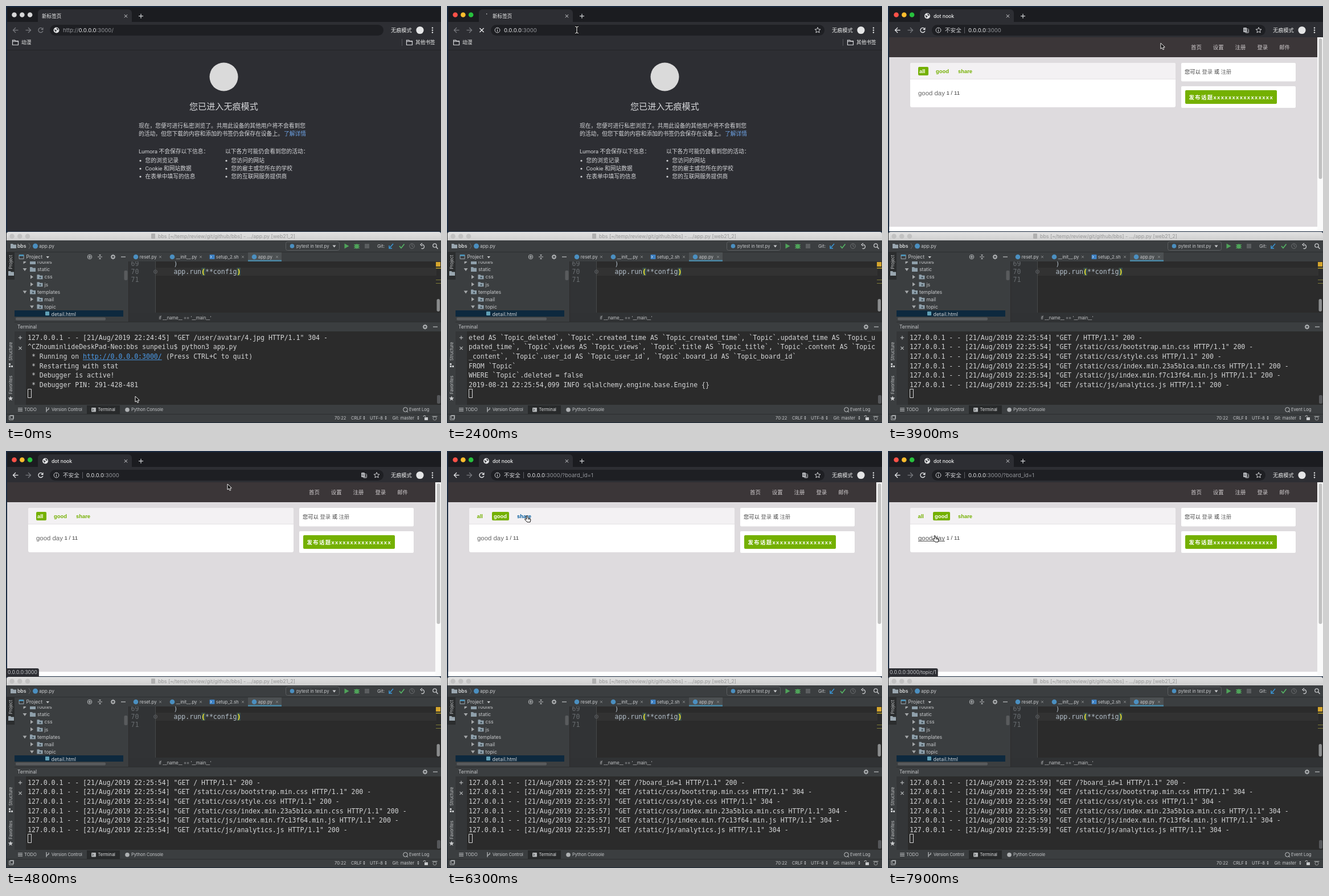
Recreate the animation shown at these times as an HTML page with a canvas. Size 764 px wide and 733 px high, loop 8 s.

```html
<!DOCTYPE html>
<html lang="zh">
<head>
<meta charset="utf-8">
<title>dot nook</title>
<style>
html, body { margin: 0; width: 100%; height: 100%; overflow: hidden; background: #2b2b2b; }
canvas { display: block; }
</style>
</head>
<body>
<canvas id="stage" width="764" height="733"></canvas>
<script>
const c = document.getElementById('stage').getContext('2d');
const UI = 'Inter, "Noto Sans CJK SC", "Noto Sans CJK", sans-serif';
const WEB = 'Roboto, "Noto Sans CJK SC", "Noto Sans CJK", sans-serif';
const PAGE = '"Liberation Sans", "Noto Sans CJK SC", "Noto Sans CJK", sans-serif';
const MONO = '"DejaVu Sans Mono", monospace';
const LOOP = 8000, CODE = 11.53, GREEN = '#74b000', PY = '#4b8fc0';

function text(s, x, y, size, color, family = UI, weight = 400, gap = 0) {
  c.font = `${weight} ${size}px ${family}`;
  c.letterSpacing = gap + 'px';
  c.fillStyle = color;
  c.fillText(s, x, y);
  const w = c.measureText(s).width;
  c.letterSpacing = '0px';
  return w;
}
function rect(x, y, w, h, color, r = 0) {
  c.fillStyle = color;
  c.beginPath();
  c.roundRect(x, y, w, h, r);
  c.fill();
}
function box(x, y, w, h, color, r = 0, lw = 1) {
  c.strokeStyle = color;
  c.lineWidth = lw;
  c.beginPath();
  c.roundRect(x, y, w, h, r);
  c.stroke();
}
function dot(x, y, r, color) {
  c.fillStyle = color;
  c.beginPath();
  c.arc(x, y, r, 0, 7);
  c.fill();
}
function arc(x, y, r, color, lw = 1, a = 0, b = Math.PI * 2) {
  c.strokeStyle = color;
  c.lineWidth = lw;
  c.beginPath();
  c.arc(x, y, r, a, b);
  c.stroke();
}
function trace(p) {
  c.beginPath();
  for (let i = 0; i < p.length; i += 2) c.lineTo(p[i], p[i + 1]);
}
function line(color, lw, ...p) {
  c.strokeStyle = color;
  c.lineWidth = lw;
  trace(p);
  c.stroke();
}
function poly(color, ...p) {
  c.fillStyle = color;
  trace(p);
  c.fill();
}
function cross(x, y, r, color, lw = 1) {
  line(color, lw, x - r, y - r, x + r, y + r);
  line(color, lw, x - r, y + r, x + r, y - r);
}
function plus(x, y, r, color) {
  line(color, 1.2, x - r, y, x + r, y);
  line(color, 1.2, x, y - r, x, y + r);
}
function folder(x, y, color) {
  poly(color, x, y, x + 4, y, x + 5, y + 1.5, x + 10, y + 1.5, x + 10, y + 8, x, y + 8);
}
function folderLine(x, y) {
  line('#d5d6d9', 1.2, x, y, x + 4, y, x + 5.5, y + 1.7, x + 10, y + 1.7, x + 10, y + 8.5, x, y + 8.5, x, y, x + 4, y);
  line('#d5d6d9', 1.2, x, y + 2, x + 10, y + 2);
}
function gear(x, y) {
  arc(x, y, 2.6, '#b4b7b9', 1.6);
  for (let i = 0; i < 8; i++) {
    const a = i * Math.PI / 4, u = Math.cos(a), v = Math.sin(a);
    line('#b4b7b9', 1.2, x + u * 3, y + v * 3, x + u * 4.5, y + v * 4.5);
  }
}
function star(x, y, r, color, filled) {
  const p = [];
  for (let i = 0; i <= 10; i++) {
    const a = -Math.PI / 2 + i * Math.PI / 5, d = i % 2 ? r * .45 : r;
    p.push(x + d * Math.cos(a), y + d * Math.sin(a));
  }
  filled ? poly(color, ...p) : line(color, 1, ...p);
}
function globe(x, y) {
  dot(x, y, 5, '#e3e4e6');
  poly('#393b3f', x - 4, y - 1.5, x - 1, y - .5, x + 1, y + 1, x - 1, y + 2, x - 1, y + 4);
  poly('#393b3f', x, y - 4, x + 3, y - 3, x + 3.5, y, x + 1, y - 1);
}
function vertical(s, x, y) {
  c.save();
  c.translate(x, y);
  c.rotate(-Math.PI / 2);
  c.textAlign = 'center';
  text(s, 0, 0, 7.5, '#c6c8ca');
  c.restore();
}
function clip(x, y, w, h, draw) {
  c.save();
  c.beginPath();
  c.rect(x, y, w, h);
  c.clip();
  draw();
  c.restore();
}

// Pointer track: time, x, y of the hot spot
const track = [
  [0, 227, 686], [300, 227, 686], [1300, 228, 42], [3400, 228, 42], [4100, 541, 71],
  [4500, 541, 71], [4800, 389, 58], [5300, 96, 115], [5800, 96, 115], [6300, 140, 114],
  [6600, 140, 114], [7000, 96, 115], [7400, 96, 115], [7900, 82, 149], [8000, 82, 149]
];
function pointer(t) {
  let i = 1;
  while (track[i][0] < t) i++;
  const [t0, x0, y0] = track[i - 1], [t1, x1, y1] = track[i];
  const k = (t - t0) / (t1 - t0), e = k * k * (3 - 2 * k);
  return [x0 + (x1 - x0) * e, y0 + (y1 - y0) * e];
}
const between = (t, a, b) => t >= a && t < b;
const inside = (p, x, y, w, h) => between(p[0], x, x + w) && between(p[1], y, y + h);

function browser(t, p) {
  const active = t >= 1400, open = t >= 2600, sent = t >= 2100;
  const busy = between(t, 2100, 3200) || between(t, 5500, 5800) || between(t, 7200, 7500);
  rect(0, 0, 764, 398, '#1a2a40');
  rect(2, 2, 762, 394, '#1b1c20');
  rect(2, 28, 762, 368, '#2d2e33');
  rect(56, 6, 165, 24, '#2d2e33', [6, 6, 0, 0]);
  ['#ff5148', '#fdbc2d', '#27c13d'].forEach((col, i) => dot(14.5 + 13.8 * i, 15.5, 4.3, active ? col : '#d6d6d7'));

  if (busy) {
    const a = open ? -1.65 + (t - 2800) / 160 : -1.8 - (t - 2400) / 200;
    arc(70, 18, 4, '#e6e7e9', 1.5, a, a + (open ? 1.9 : .3));
  } else if (open) globe(69, 17.5);
  text(open ? 'dot nook' : '新标签页', sent ? 80 : 63, 20.7, 8.6, '#eceded', UI, 500);
  cross(210.5, 17.7, 2.6, '#d8d9dc');
  plus(237, 17.7, 4, '#d8d9dc');

  const off = '#77797e', on = '#e8e9eb';
  [[17, open ? on : off, 1], [39, off, -1]].forEach(([x, col, d]) => {
    line(col, 1.3, x - 4.5 * d, 42.5, x + 4.5 * d, 42.5);
    line(col, 1.3, x, 38, x - 4.5 * d, 42.5, x, 47);
  });
  if (busy) cross(61, 42.5, 3.6, on, 1.4);
  else {
    const col = active ? on : off;
    arc(61, 42.5, 4, col, 1.4, .3, 5.3);
    poly(col, 65.5, 37.5, 65.5, 42, 61, 42);
  }
  const focused = active && !sent;
  rect(77, 33, 586, 19, focused ? '#2f3136' : '#1e1f23', 9.5);
  const grey = '#94969b', white = '#e8e9eb', size = 9.6;
  let x = 100;
  if (!sent) {
    if (focused) box(76.7, 32.7, 586.6, 19.4, '#51779e', 9.7, 1.5);
    globe(88.5, 42.5);
    x += text('http://', x, 45.8, size, grey);
    x += text('0.0.0.0', x, 45.8, size, white);
    x += text(':3000/', x, 45.8, size, grey);
    if (focused && (t - 1400) % 1000 < 500) line(white, 1, x + .5, 37, x + .5, 48);
  } else {
    arc(88.5, 42.5, 4.4, '#d5d6d9');
    line('#d5d6d9', 1.1, 88.5, 42, 88.5, 45);
    dot(88.5, 40.3, .7, '#d5d6d9');
    if (open) {
      text('不安全', x, 45.8, 9.6, '#d5d6d9');
      line('#5d5f64', 1, 134.5, 37, 134.5, 48);
      x = 141;
    }
    x += text('0.0.0.0', x, 45.8, size, white);
    text(':3000' + (t >= 5500 ? '/?board_id=1' : ''), x, 45.8, size, grey);
    star(651, 42.7, 5.2, '#d5d6d9');
    if (open && !busy) {
      rect(624, 38, 6, 8, '#b9bbbf', 1);
      box(627.5, 40.5, 6, 6.5, '#b9bbbf', 1);
      text('G', 625, 44, 5, '#1e1f23');
      text('文', 628.5, 46, 4.5, '#d5d6d9');
    }
  }
  text('无痕模式', 676, 46, 9.2, '#eceded', UI, 500);
  dot(727, 42.5, 6.6, '#e4e5e6');
  for (let i = 0; i < 3; i++) dot(749, 38.5 + 4 * i, 1.2, '#e4e5e6');

  open ? site(t, p) : welcome();
  const status = statusAt(t);
  if (status) {
    c.font = '400 8.6px ' + UI;
    const w = c.measureText(status).width + 6;
    rect(0, 382, w, 15, '#2d2e33', [0, 3, 0, 0]);
    text(status, 3, 392.2, 8.6, '#c8cacd');
  }
}

function statusAt(t) {
  const url = '0.0.0.0:3000';
  if (between(t, 4200, 4950)) return url;
  if (between(t, 5400, 5500) || between(t, 7100, 7200)) return url + '/?board_id=1';
  if (between(t, 6400, 6800)) return url + '/?board_id=2';
  return t >= 7800 ? url + '/topic/1' : '';
}

function welcome() {
  const col = '#d6d7da', s = 9.77;
  folderLine(11.5, 60);
  text('动漫', 27, 67.3, 8.7, '#eceded', UI, 500);
  line('#55575c', 1, 695.5, 58, 695.5, 70);
  folderLine(703.5, 60);
  text('其他书签', 719, 67.3, 8.7, '#eceded', UI, 500);
  line('#232428', 1, 2, 77.5, 764, 77.5);
  dot(382.5, 124.5, 25, '#dadada');
  text('您已进入无痕模式', 322, 181.5, 15.1, col, WEB);
  text('现在，您便可进行私密浏览了。共用此设备的其他用户将不会看到您', 233, 214, s, col, WEB);
  text('的活动，但您下载的内容和添加的书签仍会保存在设备上。', 233, 228.3, s, col, WEB);
  text('了解详情', 488, 228.3, s, '#6fa5e8', WEB);
  text('Lumora 不会保存以下信息：', 233, 258.5, s, col, WEB);
  text('以下各方可能仍会看到您的活动：', 385, 258.5, s, col, WEB);
  const lists = [
    [236, '您的浏览记录', 'Cookie 和网站数据', '在表单中填写的信息'],
    [387, '您访问的网站', '您的雇主或您所在的学校', '您的互联网服务提供商']
  ];
  for (const [x, ...items] of lists) items.forEach((item, i) => {
    dot(x, 272 + 14 * i, 1.6, col);
    text(item, x + 8.5, 275.3 + 14 * i, s, col, WEB);
  });
}

function site(t, p) {
  const styled = t >= 3100;
  rect(2, 55, 752, 333, '#dedbde');
  rect(2, 388, 752, 8, '#fff');
  rect(2, 55, 752, 35, '#3b3638');
  rect(754, 55, 10, 341, '#fafafa');
  rect(756.5, 57, 6, 247, '#c1c1c1', 3);
  ['首页', '设置', '注册', '登录', '邮件'].forEach((s, i) =>
    text(s, 532 + 38.8 * i, 75.7, 9.4, i === 0 && inside(p, 530, 64, 24, 16) ? '#fff' : '#d0ccce', PAGE));

  rect(39, 100, 466, 78, '#fff', 3);
  rect(39, 100, 466, 28.5, '#f3f1f3', [3, 3, 0, 0]);
  line('#e3e1e3', 1, 39, 128.5, 505, 128.5);
  const chosen = t >= 5600 ? 1 : 0;
  [['all', 55, 53, 18], ['good', 84, 79, 30], ['share', 123, 120, 30]].forEach(([s, x, bx, w], i) => {
    const on = i === chosen, hover = inside(p, bx, 107, w, 15);
    if (on) rect(bx, 107, w, 15, GREEN, 2);
    const tx = i === 0 && !on ? 52.5 : i === 1 && on ? 82 : x;
    text(s, tx, 118, 9.4, on ? '#fff' : hover ? '#005a9c' : GREEN, PAGE, 700);
  });
  const onTopic = inside(p, 52, 146, 50, 13);
  const w = text('good day', 53, 157, 11.4, onTopic ? '#555' : '#666', PAGE);
  if (onTopic) line('#555', 1, 53, 158.5, 53 + w, 158.5);
  text('1 / 11', 102.5, 156, 9.7, '#333', PAGE);

  rect(515, 100, 201, 32.5, '#fff', 2);
  let x = 521;
  ['您可以 ', '登录 ', '或 ', '注册'].forEach((s, i) => x += text(s, x, 119, 9.3, i % 2 ? '#666' : '#333', PAGE));
  rect(515, 141, 201, styled ? 38 : 34.5, '#fff', 2);
  const label = '发布话题' + 'x'.repeat(16);
  if (styled) {
    rect(522, 148, 161, 24, GREEN, 2);
    text(label, 528.5, 163.5, 9.4, '#fff', PAGE, 700, 1.38);
  } else {
    rect(522, 149, 138, 18, '#f0f0ea');
    text(label, 522.5, 162.3, 11.4, '#1450b8', PAGE);
  }
}

function ide(t) {
  const col = '#c8cacc', panel = '#3b3e40';
  rect(0, 398, 764, 335, panel);
  const bar = c.createLinearGradient(0, 397, 0, 412);
  bar.addColorStop(0, '#e2e2e2');
  bar.addColorStop(1, '#cfcfcf');
  rect(1, 397, 763, 15, bar, [4, 4, 0, 0]);
  for (let i = 0; i < 3; i++) dot(10.5 + 13.7 * i, 404.7, 4.3, '#c2c2c2');
  rect(255, 400, 7, 9, '#b0b0b0', 1);
  text('bbs [~/temp/review/git/github/bbs] - .../app.py [web21_2]', 267, 408, 8.87, '#999');

  // Navigation row
  folder(8, 418, '#9aa7b0');
  text('bbs', 20, 425.2, 8.6, '#d6d8d9', UI, 600);
  line('#65686a', 1, 40, 417, 43, 422, 40, 427);
  dot(51.5, 422, 4.5, PY);
  text('app.py', 58, 425.2, 8.4, col);
  box(491.5, 414.5, 94, 15, '#5b5e60', 3);
  dot(502.5, 422, 3.8, PY);
  text('pytest in test.py', 510, 425, 7.65, col);
  poly(col, 573.5, 420.5, 579.5, 420.5, 576.5, 424.5);
  poly('#4fa35a', 594.5, 417.5, 602.5, 422, 594.5, 426.5);
  rect(612.5, 418.5, 7, 8, '#4fa35a', 3);
  for (let i = 0; i < 3; i++) line('#4fa35a', 1, 611, 419.5 + 3 * i, 621, 419.5 + 3 * i);
  rect(630, 418, 8, 8, '#5b5e60');
  text('Git:', 652, 425, 8.2, col);
  line('#3a96d6', 1.5, 680, 418, 673.5, 425.5);
  line('#3a96d6', 1.5, 673, 421, 673, 426, 678, 426);
  line('#55b364', 1.7, 691, 422, 694, 425.5, 699.5, 418.5);
  arc(713, 422, 4.3, '#6c6f71');
  line('#6c6f71', 1, 713, 419, 713, 422, 715, 423);
  arc(731, 423, 3.5, col, 1.4, -1.6, 2);
  line(col, 1.3, 731, 417, 728, 419.5, 731, 422);
  arc(753, 421, 3.2, col, 1.3);
  line(col, 1.4, 755.5, 423.5, 758.5, 427);
  line('#2c2e2f', 1, 0, 432.5, 764, 432.5);

  // Left stripe
  rect(1, 433, 14, 48, '#2b2d2e');
  vertical('Project', 10.5, 450);
  folder(4, 466, '#9aa7b0');
  vertical('Structure', 10.5, 607);
  rect(5, 628, 3, 3, col);
  rect(5, 632, 3, 3, col);
  rect(9, 632, 3, 3, col);
  vertical('Favorites', 10.5, 666);
  star(8, 690, 4.5, col, true);

  // Project tree
  box(23, 437.5, 8, 7, '#9aa7b0');
  rect(23, 437, 8, 2.5, '#4d9dc6');
  text('Project', 35.5, 444.3, 8.6, col);
  poly(col, 70.5, 440, 76, 440, 73.2, 443.5);
  arc(147, 441, 3.8, '#b4b7b9');
  plus(147, 441, 2.4, '#b4b7b9');
  line('#b4b7b9', 1.1, 161, 441, 169, 441);
  poly('#b4b7b9', 163, 437, 167, 437, 165, 439.5);
  poly('#b4b7b9', 163, 445, 167, 445, 165, 442.5);
  gear(188, 441);
  line('#b4b7b9', 1.3, 202, 441, 210, 441);
  const rows = [['routes', 1, 0], ['static', 1, 1], ['css', 2, 0], ['js', 2, 0], ['templates', 1, 1], ['mail', 2, 0], ['topic', 2, 1]];
  clip(15, 449, 200, 98, () => {
    rows.forEach(([s, depth, open], i) => {
      const x = 20 + 12.5 * depth, y = 450 + 13.1 * i;
      if (open) poly('#a5a8aa', x - 3, y - 2, x + 4, y - 2, x + .5, y + 3);
      else poly('#a5a8aa', x - 2, y - 3.5, x + 3, y, x - 2, y + 3.5);
      folder(x + 9.5, y - 4, '#8fa0ab');
      if (i > 1) dot(x + 15, y + 1, 1.5, '#40505a');
      text(s, x + 22.5, y + 3.2, 8.7, col);
    });
    rect(15, 535, 191, 11, '#0d293e');
    rect(69, 537, 7, 7, '#5f9fb5', 1);
    text('detail.html', 79.5, 544.6, 8.9, '#d0d2d4');
  });
  rect(17, 547.5, 158, 5, '#595b5d', 2);
  rect(207.5, 465, 6, 17, '#595b5d', 2);

  // Editor
  rect(215, 449, 549, 106, '#2b2b2b');
  rect(216, 449, 46, 90, '#313335');
  rect(425, 433, 59, 16, '#4c5052');
  rect(425, 446.5, 59, 2.5, '#4a88a6');
  [[228, 'reset.py', 271], [292, '__init__.py', 342], [362, 'setup_2.sh', 416], [436, 'app.py', 476]].forEach(([x, s, end], i) => {
    if (i === 2) {
      rect(x - 4.5, 437, 9, 8, '#3f82c4', 1);
      line('#e7eef5', 1, x - 3, 439, x - 1, 441, x - 3, 443);
    } else dot(x, 441, 4.3, PY);
    text(s, x + 6.8, 443.7, 7.8, col);
    cross(end, 441, 2, '#85888a', .9);
  });
  rect(262, 460, 494, 14, '#323232');
  clip(216, 449, 540, 90, () => {
    [69, 70, 71].forEach((n, i) => text(n, 219.5, 457 + 14.1 * i, CODE, '#686c70', MONO));
    text(')', 294.5, 456.5, CODE, '#b3bfca', MONO);
    rect(343.5, 460, 6.5, 14, '#3b514d');
    rect(405.3, 460, 6.5, 14, '#3b514d');
    let x = 294.5;
    [['app.run', '#b3bfca'], ['(', '#ffef28'], ['**config', '#b3bfca'], [')', '#ffef28']].forEach(([s, k]) =>
      x += text(s, x, 471, CODE, k, MONO, k === '#ffef28' ? 700 : 400));
  });
  line('#45484a', 1, 262.5, 449, 262.5, 539);
  arc(262.5, 467, 3, '#606366');
  line('#606366', 1, 261, 467, 264, 467);
  rect(755, 450, 8, 8, '#d5a52c');
  rect(755, 460, 9, 1.5, '#b8a12c');
  rect(755, 481, 9, 1, '#7d7a36');
  rect(755, 487, 9, 1, '#7d7a36');
  rect(756.5, 515, 5.5, 22, '#8a8c8d', 3);
  rect(216, 539, 548, 16, '#303234');
  text("if __name__ == '__main__'", 268.5, 550.8, 7.7, '#c0c2c4');

  terminal(t);

  // Bottom rows
  rect(0, 701, 764, 16, panel);
  line('#2c2e2f', 1, 0, 717.5, 764, 717.5);
  rect(142, 702, 58, 15, '#282a2b');
  for (let i = 0; i < 3; i++) line(col, 1, 21, 707 + 2.5 * i, 29, 707 + 2.5 * i);
  text('TODO', 32, 712.4, 7.6, col);
  line(col, 1.1, 71, 705, 71, 714);
  line(col, 1.1, 71, 711, 75, 709, 75, 706);
  text('Version Control', 80, 712.4, 7.4, col);
  rect(150, 706, 8, 7.5, '#b4b7b9', 1);
  line('#282a2b', 1, 151.5, 708, 153.5, 709.7, 151.5, 711.5);
  text('Terminal', 161.5, 712.4, 7.5, '#e0e1e2');
  dot(213, 709.7, 3.8, '#aeb1b3');
  text('Python Console', 220, 712.4, 7.5, col);
  arc(701.5, 709.5, 3.8, col);
  line(col, 1, 703, 712, 706, 714);
  text('Event Log', 708, 712.4, 7.5, col);
  box(5.5, 720.5, 7, 7, '#a5a8aa');
  box(7.5, 719.5, 6, 6, '#a5a8aa');
  text('70:22', 577, 727, 7.6, col);
  [['CRLF', 606, 629], ['UTF-8', 639, 667], ['Git: master', 678.5, 724]].forEach(([s, x, mark]) => {
    text(s, x, 727, 7.5, col);
    poly(col, mark - 1.7, 723.3, mark + 1.7, 723.3, mark, 720.8);
    poly(col, mark - 1.7, 724.7, mark + 1.7, 724.7, mark, 727.2);
  });
  rect(735, 723, 6, 5, col);
  arc(735, 722, 2, col, 1, Math.PI, 0);
  arc(753, 725, 3, '#95989a');
  line('#95989a', 1.5, 748.5, 721.5, 757.5, 721.5);
  rect(0, 412, 1, 321, '#1d2935');
  rect(0, 732, 764, 1, '#1d2935');
}

function terminal(t) {
  rect(15, 555, 749, 17, '#3b3e40');
  line('#2c2e2f', 1, 15, 555.5, 764, 555.5);
  text('Terminal', 20, 567, 8.4, '#c8cacc');
  gear(736, 564);
  line('#b4b7b9', 1.3, 750, 564, 758, 564);
  rect(15, 572, 20, 129, '#343638');
  rect(35, 572, 729, 129, '#2b2b2b');
  plus(25, 583, 3.2, '#b4b7b9');
  cross(25, 601.5, 2.6, '#b4b7b9', 1.2);
  rect(757, 684, 6, 15, '#55575a', 2);
  const col = '#d4d5d6', y = i => 586.8 + 16.6 * i;
  log(t).forEach((s, i) => {
    let x = 38;
    s.split(/(http:\/\/[^ ]+)/).forEach((part, k) => {
      const w = text(part, x, y(i), CODE, k % 2 ? '#4b9bea' : col, MONO);
      if (k % 2) line('#4b9bea', 1, x, y(i) + 2, x + w, y(i) + 2);
      x += w;
    });
  });
  box(38.5, 673.5, 6, 15, col);
}

function log(t) {
  if (t < 2300) return [
    '127.0.0.1 - - [21/Aug/2019 22:24:45] "GET /user/avatar/4.jpg HTTP/1.1" 304 -',
    '^CZhouminlideDeskPad-Neo:bbs sunpeilu$ python3 app.py',
    ' * Running on http://0.0.0.0:3000/ (Press CTRL+C to quit)',
    ' * Restarting with stat',
    ' * Debugger is active!',
    ' * Debugger PIN: 291-428-481'
  ];
  if (t < 2600) return [
    'eted AS `Topic_deleted`, `Topic`.created_time AS `Topic_created_time`, `Topic`.updated_time AS `Topic_u',
    'pdated_time`, `Topic`.views AS `Topic_views`, `Topic`.title AS `Topic_title`, `Topic`.content AS `Topic',
    '_content`, `Topic`.user_id AS `Topic_user_id`, `Topic`.board_id AS `Topic_board_id`',
    'FROM `Topic`',
    'WHERE `Topic`.deleted = false',
    '2019-08-21 22:25:54,099 INFO sqlalchemy.engine.base.Engine {}'
  ];
  const again = t >= 5700, sec = t >= 7400 ? 59 : again ? 57 : 54;
  const files = ['css/bootstrap.min.css', 'css/style.css', 'css/index.min.23a5b1ca.min.css', 'js/index.min.f7c13f64.min.js', 'js/analytics.js'];
  return [again ? '/?board_id=1' : '/', ...files.map(f => '/static/' + f)].map((path, i) =>
    `127.0.0.1 - - [21/Aug/2019 22:25:${sec}] "GET ${path} HTTP/1.1" ${again && i ? 304 : 200} -`);
}

function cursor(t, [x, y]) {
  const open = t >= 2600;
  const link = open && (inside([x, y], 52, 107, 100, 15) || inside([x, y], 52, 146, 50, 13) || inside([x, y], 530, 64, 24, 16));
  c.save();
  c.translate(x, y);
  c.lineJoin = 'round';
  if (inside([x, y], 77, 33, 586, 19)) {
    for (const [col, lw] of [['#000', 3], ['#eee', 1.2]]) {
      line(col, lw, -3, -6, 0, -5, 3, -6);
      line(col, lw, 0, -5, 0, 5);
      line(col, lw, -3, 6, 0, 5, 3, 6);
    }
  } else {
    const shape = link
      ? [-1, 0, 1, 0, 2, 4, 6, 5, 7, 7, 6, 11, 1, 11, -3, 7, -3, 5, 0, 6]
      : [0, 0, 0, 10, 2.4, 8, 4, 11.5, 5.8, 10.7, 4.3, 7.3, 7.3, 7];
    const fill = link ? '#fff' : '#111', edge = link ? '#111' : '#f2f2f2';
    poly(fill, ...shape);
    line(edge, 1, ...shape, shape[0], shape[1]);
    if (link) {
      line(edge, .8, 3, 5, 3, 7);
      line(edge, .8, 5, 5.5, 5, 7);
    }
  }
  c.restore();
}

function frame(now) {
  const t = Math.floor(now % LOOP / 100) * 100, p = pointer(t);
  c.clearRect(0, 0, 764, 733);
  browser(t, p);
  ide(t);
  cursor(t, p);
  requestAnimationFrame(frame);
}
requestAnimationFrame(frame);
</script>
</body>
</html>
```
